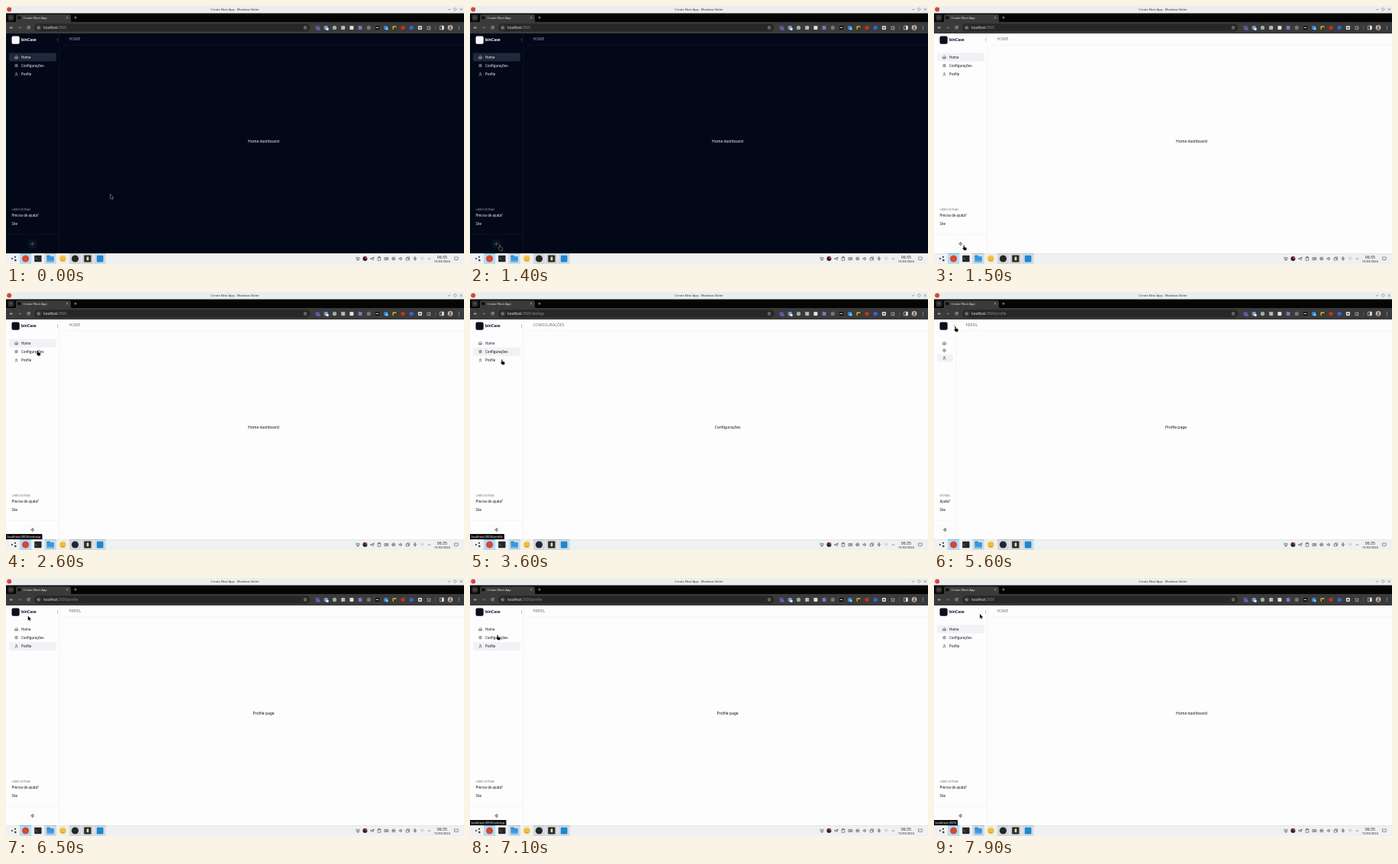
An HTML page for the animation above (8 s loop, 600 px wide and 338 px high).

```html
<!DOCTYPE html>
<html lang="pt">
<head>
<meta charset="utf-8">
<title>Dashboard</title>
<style>
html, body { margin: 0; width: 100%; height: 100%; overflow: hidden; background: #fff; }
svg { display: block; width: 600px; height: 338px; font-family: "Noto Sans", sans-serif; }
</style>
</head>
<body>
<svg id="stage" viewBox="0 0 600 338">
  <g id="page"></g>
  <g id="chrome"></g>
  <g id="live"></g>
  <g id="bar"></g>
  <g id="cursor"></g>
</svg>
<script>
const LOOP = 8000, STEP = 100;
const $ = id => document.getElementById(id);

// Drawing helpers; text is centred on y
const rect = (x, y, w, h, fill, r = 0, extra = '') =>
  `<rect x="${x}" y="${y}" width="${w}" height="${h}" rx="${r}" fill="${fill}" ${extra}/>`;
const dot = (x, y, r, fill, extra = '') => `<circle cx="${x}" cy="${y}" r="${r}" fill="${fill}" ${extra}/>`;
const line = (d, color, w = 0.7, fill = 'none') =>
  `<path d="${d}" fill="${fill}" stroke="${color}" stroke-width="${w}" stroke-linecap="round" stroke-linejoin="round"/>`;
const text = (x, y, s, size, fill, extra = '') =>
  `<text x="${x}" y="${(y + size * 0.36).toFixed(2)}" font-size="${size}" fill="${fill}" ${extra}>${s}</text>`;
const mid = 'text-anchor="middle"';

// Line icons on a 24 unit grid
const ICONS = {
  home: 'M3 10l9-7 9 7v11H3zM9 21v-9h6v9',
  gear: 'M12 3l3 2 4 0 1 4 2 3-2 3-1 4-4 0-3 2-3-2-4 0-1-4-2-3 2-3 1-4 4 0zM9 12a3 3 0 1 0 6 0a3 3 0 1 0-6 0',
  user: 'M8 7a4 4 0 1 0 8 0a4 4 0 1 0-8 0M5 21v-2a4 4 0 0 1 4-4h6a4 4 0 0 1 4 4v2',
  sun: 'M8 12a4 4 0 1 0 8 0a4 4 0 1 0-8 0M12 2v2M12 20v2M2 12h2M20 12h2M5 5l1 1M18 18l1 1M5 19l1-1M18 6l1-1',
  moon: 'M12 7a5 5 0 1 0 5 5a4 4 0 0 1-5-5M12 2v2M12 20v2M2 12h2M5 5l1 1M5 19l1-1M13 3a9 9 0 0 1 0 18',
  back: 'M21 12H4M11 5l-7 7 7 7',
  next: 'M3 12h17M13 5l7 7-7 7',
  reload: 'M20 12a8 8 0 1 1-2.5-6M20 2v6h-6',
  star: 'M12 3l2.8 6 6.2.7-4.6 4.3 1.3 6.5L12 17l-5.7 3.5 1.3-6.5L3 9.7 9.200 9z',
  puzzle: 'M4 7h5a3 3 0 1 1 6 0h5v5a3 3 0 1 0 0 5v4H4v-5a3 3 0 0 0 0-5z',
  down: 'M5 9l7 7 7-7',
  up: 'M5 16l7-7 7 7',
  cross: 'M5 5l14 14M19 5L5 19',
  plus: 'M12 4v16M4 12h16',
  diamond: 'M12 4l8 8-8 8-8-8z',
  send: 'M2 12L22 4l-5 16-6-5zM11 15L22 4',
  clip: 'M5 4h14v18H5zM9 2h6v5H9z',
  keys: 'M2 6h20v13H2zM6 10h1M11 10h1M16 10h1M7 15h10',
  ring: 'M3 12a9 9 0 1 0 18 0a9 9 0 1 0-18 0M9 9h6v6H9z',
  sound: 'M3 9v6h4l6 5V4L7 9zM17 8a5 5 0 0 1 0 8',
  mic: 'M9 3h6v10H9zM5 11a7 7 0 0 0 14 0M12 18v4',
  wifi: 'M2 9a15 15 0 0 1 20 0M6 14a9 9 0 0 1 12 0M12 19h.1',
  copy: 'M3 8h13v13H3zM8 8V3h13v13h-5',
  bell: 'M4 4l4 3h8l4-3v8a8 8 0 0 1-16 0zM9 12h1M14 12h1M8 21h8',
  note: 'M3 4h18v13h-6l-4 4v-4H3z'
};
const icon = (name, x, y, size, color, w = 2, fill = 'none') =>
  `<g transform="translate(${x - size / 2} ${y - size / 2}) scale(${size / 24})">${line(ICONS[name], color, w, fill)}</g>`;
const dots = (x, y, gap, r, color) => [-1, 0, 1].map(i => dot(x, y + i * gap, r, color)).join('');

function windowFrame() {
  const pale = '#d8d8d8';
  let s = rect(0, 0, 600, 9.5, '#eceded') + dot(4.2, 4.6, 3, '#db4437');
  s += text(300, 4.6, 'Create Next App - Meadow Glider', 4.08, '#303336', mid);
  s += icon('down', 580.5, 4.5, 5, '#45494c', 2.5) + icon('diamond', 588.5, 4.5, 5.5, '#45494c', 2.2)
     + icon('cross', 596.3, 4.5, 4.6, '#45494c', 2.5);
  s += rect(0, 9.5, 600, 12, '#050505') + rect(2.3, 11.2, 8, 8, '#303030', 2.3)
     + icon('down', 6.3, 15.3, 4, pale, 3);
  s += '<path d="M10.500 21.500q2.500 0 2.500-2.500v-5.500q0-2.500 2.500-2.500h67q2.500 0 2.500 2.500v5.500q0 2.500 2.500 2.500z" fill="#3a3a3a"/>';
  s += dot(17.3, 15.3, 2.3, '#111') + text(22.5, 15.3, 'Create Next App', 4.1, '#e6e6e6');
  s += icon('cross', 80.2, 15.2, 3.8, pale, 3) + icon('plus', 91, 15.2, 4.4, pale, 2.8);
  s += rect(0, 21, 600, 15, '#3a3a3a') + rect(37, 23.3, 361.5, 10.2, '#272727', 5.1);
  s += icon('back', 7, 28.4, 5, '#e6e6e6', 2.7) + icon('next', 18, 28.4, 5, '#858585', 2.7)
     + icon('reload', 29.4, 28.4, 5.2, '#e6e6e6', 2.6);
  s += dot(42.8, 28.4, 3.4, '#3a3a3a') + icon('ring', 42.8, 28.4, 4.2, pale, 2);
  s += icon('star', 392, 28.4, 5.5, pale);
  const tints = ['#6b4fa0', '#6f9de0', '#a9a9a9', '#b8b8b8', '#dedede', '#7b70c4', '#6f7780',
    '#0c0c0c', '#2b8ae2', '#b79a29', '#c92d2d', '#3463d8', '#e8e8e8'];
  tints.forEach((c, i) => {
    const x = 408 + i * 11.2;
    s += [2, 6, 10, 11].includes(i) ? dot(x, 28.4, 2.6, c) : rect(x - 2.5, 25.9, 5, 5, c, 0.8);
  });
  s += rect(407.8, 28.8, 3.6, 3, '#7a58bd', 0.6) + rect(419.5, 28.8, 3, 3, '#eee', 0.4)
     + rect(484.7, 27.8, 3.2, 1.1, '#eee') + rect(497.5, 28.3, 3, 3, '#7cc8ee', 0.5)
     + rect(508, 28, 3.200, 3.200, '#333', 0.4) + rect(541.4, 27.4, 2.2, 2.2, '#444');
  s += icon('puzzle', 554, 28.4, 5.8, '#e2e2e2', 2.3) + rect(562.2, 25.4, 0.5, 6, '#666');
  s += rect(568.4, 26, 5, 4.8, 'none', 0.5, 'stroke="#e2e2e2" stroke-width=".6"') + rect(571, 26, 2.5, 4.8, '#e2e2e2');
  s += dot(582, 28.4, 3.3, '#cbbcae') + dot(582, 27.3, 1.2, '#71594c')
     + '<path d="M579.800 30.800a2.200 2.200 0 0 1 4.400 0z" fill="#71594c"/>';
  return s + dots(593.3, 28.4, 1.8, 0.5, '#e6e6e6');
}

function taskbar() {
  const ink = '#30363a';
  let s = rect(0, 324, 600, 14, '#eff0f1') + rect(0, 324, 600, 0.4, '#d5d7d9');
  const slot = (x, c, edge) => rect(x, 324.2, 15.2, 13.8, c) + rect(x, 324.2, 15.2, 0.7, edge);
  s += slot(18, '#b4ddf0', '#3daee9') + slot(50.5, '#cfdbe2', '#93bdd4')
     + slot(83, '#d3d8db', '#a9b8c1') + slot(99.3, '#d3d8db', '#a9b8c1') + slot(115.5, '#cfdbe2', '#93bdd4');
  s += dot(8, 331, 1.1, ink) + dot(12, 328.8, 1.1, ink) + dot(12.3, 333, 1.3, ink);
  s += dot(25.6, 331, 4.6, '#db4437');
  s += rect(37.2, 326.8, 9.4, 8.5, '#232629', 0.8) + text(38.4, 330.6, '&gt;_', 3.4, '#e8e8e8');
  s += rect(53.5, 326.8, 4.5, 3, '#2377b8', 0.5) + rect(53.5, 328, 9.4, 7.4, '#3798df', 0.6)
     + rect(53.5, 333.8, 9.4, 1.6, '#63baf1', 0.5);
  s += dot(74.4, 331, 4.5, '#f7c948') + dot(72.8, 330, 0.5, '#6b4a12') + dot(76, 330, 0.5, '#6b4a12')
     + line('M72.500 333q2 1.200 3.800 0', '#6b4a12', 0.5);
  s += dot(90.5, 331, 4.6, '#25262a');
  s += rect(102.3, 326.6, 9.2, 8.8, '#292724', 0.6) + rect(105.6, 328.5, 2.8, 4.8, '#e5d6b1', 0.4);
  s += rect(118.9, 326.8, 8.6, 8.6, '#1f86cf', 1);
  const tray = ['bell', '', 'send', 'clip', 'keys', 'ring', 'sound', 'copy', 'mic', 'wifi', 'up'];
  tray.forEach((n, i) => {
    const x = 461 + i * 9.36;
    s += n ? icon(n, x, 331, 5.6, n === 'wifi' ? '#a0a5a8' : ink, 2.2) : dot(x, 331, 3, '#242424') + dot(x + 1.2, 329.8, 1.4, '#d8363c');
  });
  s += text(571.3, 328.8, '06:35', 5.1, '#232629', mid) + text(571.3, 334.4, '15/03/2024', 3.95, '#232629', mid);
  return s + icon('note', 590, 331, 6, ink);
}

const PAGES = {
  home: { path: '', head: 'HOME', body: 'Home dashboard', row: 0 },
  settings: { path: '/settings', head: 'CONFIGURAÇÕES', body: 'Configurações', row: 1 },
  profile: { path: '/profile', head: 'PERFIL', body: 'Profile page', row: 2 }
};
const NAV = [['home', 'Home'], ['gear', 'Configurações'], ['user', 'Profile']];
const DARK = { bg: '#020817', ink: '#f8fafc', soft: '#94a3b8', edge: '#162033', pick: '#1e293b', btn: '#0a1221' };
const LIGHT = { bg: '#fdfdfd', ink: '#0a0f1c', soft: '#6b7482', edge: '#e5e8ed', pick: '#f1f2f5', btn: '#fdfdfd' };

function drawPage(view, dark, open) {
  const c = dark ? DARK : LIGHT, p = PAGES[view], w = open ? 70 : 29;
  let s = rect(0, 35, 600, 290, c.bg);
  s += rect(w - 0.4, 36, 0.5, 288, c.edge) + rect(w + 5, 50.8, 600 - w - 5, 0.5, c.edge) + rect(0, 298.8, w, 0.5, c.edge);
  s += rect(7.5, 39.6, 10.2, 10.2, c.ink, 2);
  if (open) s += text(20, 44.6, 'binCase', 5, c.ink, 'font-weight="700"');
  s += dots(w - 2.5, 44.6, 1.7, 0.42, c.ink);
  const top = 67, gap = open ? 11.25 : 9.8;
  s += rect(4, top + p.row * gap - (open ? 5.6 : 4.9), open ? 62 : 21, open ? 11.2 : 9.8, c.pick, 1.6);
  NAV.forEach(([name, label], i) => {
    s += icon(name, 13.6, top + i * gap - 0.1, 5, c.ink, 2);
    if (open) s += text(20, top + i * gap, label, 4.375, c.ink);
  });
  s += text(7.5, 266.2, open ? 'LINKS EXTRAS' : 'EXTRAS', 3.75, c.soft);
  s += text(7.5, 274.3, open ? 'Precisa de ajuda?' : 'Ajuda?', 4.375, c.ink) + text(7.5, 285.6, 'Site', 4.375, c.ink);
  const bx = open ? 34.6 : 14.2;
  s += rect(bx - 5.5, 306, 11, 11, c.btn, 1.8, `stroke="${dark ? '#111a2b' : '#f4f5f7'}" stroke-width=".4"`);
  s += icon(dark ? 'sun' : 'moon', bx, 311.5, 5, dark ? '#8b95a5' : c.ink, 2);
  s += text(w + 12.5, 43.6, p.head, 5, c.soft);
  return s + text((w + 600) / 2 + 2.5, 176.7, p.body, 5, c.ink, mid);
}

function drawLive(view, hint) {
  let s = text(49, 28.4, `localhost<tspan fill="#8d8d8d">:3000${PAGES[view].path}</tspan>`, 4.45, '#ededed');
  if (hint) {
    const p = PAGES[hint].path, w = { home: 31, settings: 47.5, profile: 45 }[hint];
    s += `<path d="M0 317h${w - 1}q1 0 1 1v6H0z" fill="#101010"/>` + text(1.5, 320.7, 'localhost:3000' + p, 4.06, '#f0f0f0');
  }
  return s;
}

// Last entry at or before t
const pick = (list, t) => list.reduce((v, [at, next]) => t >= at ? next : v, null);
const VIEWS = [[0, 'home'], [2800, 'settings'], [3700, 'profile'], [7200, 'settings'], [7600, 'home']];
const HINTS = [[2600, 'settings'], [3000, 'profile'], [4500, null], [7000, 'settings'], [7300, 'home']];
const PATH = [[0, 136.5, 246.5], [400, 136.5, 246.5], [600, 133, 240], [1300, 38.5, 313.2], [1700, 38.5, 313.2],
  [2400, 41, 76.5], [2800, 41, 76.5], [3100, 41.3, 88.3], [3900, 41.3, 88.3], [4500, 71, 43.5], [4800, 66.2, 46],
  [5100, 66.2, 46], [5600, 27.5, 45], [6300, 27.5, 45], [7100, 35.5, 74.4], [7200, 35.5, 74.4], [7300, 32, 65],
  [7600, 32, 65], [7900, 60, 47], [8000, 60, 47]];

function pointer(t) {
  const i = Math.max(1, PATH.findIndex(k => k[0] > t));
  const [t0, x0, y0] = PATH[i - 1], [t1, x1, y1] = PATH[i];
  const u = (t - t0) / (t1 - t0), e = u * u * (3 - 2 * u);
  return [x0 + (x1 - x0) * e, y0 + (y1 - y0) * e];
}

const ARROW = 'M0 0v6l1.400-1.200 1 2 .9-.4-.9-2h1.800z';
const HAND = 'M0 .5q.6-1 1.200 0v2.300l2.300.5q.9.2.7 1.200l-.4 2.400h-2.900l-2-2.500q0-.9.900-.5l.2.2z';

function drawCursor(t, open) {
  const [x, y] = pointer(t), w = open ? 70 : 29;
  const onNav = x > 4 && x < w - 4 && y > 61 && y < 95;
  const onLink = x > 7 && x < (y < 280 ? 43 : 15) && y > 271 && y < 288;
  const onBtn = Math.abs(x - (open ? 34.6 : 14.2)) < 5.6 && Math.abs(y - 311.5) < 5.6;
  const onDots = Math.abs(x - w + 2.5) < 3.5 && Math.abs(y - 44.6) < 4;
  const shape = onNav || onLink || onBtn || onDots ? HAND : ARROW;
  return `<path transform="translate(${x.toFixed(2)} ${y.toFixed(2)})" d="${shape}" fill="#080808" stroke="#fff" stroke-width=".6" paint-order="stroke" stroke-linejoin="round"/>`;
}

const shown = {};
function put(id, html) {
  if (shown[id] !== html) $(id).innerHTML = shown[id] = html;
}

function render(ms) {
  const t = Math.floor((ms % LOOP) / STEP) * STEP;
  const view = pick(VIEWS, t), open = t < 5200 || t >= 6400;
  put('page', drawPage(view, t < 1500, open));
  put('live', drawLive(view, pick(HINTS, t)));
  put('cursor', drawCursor(t, open));
}

put('chrome', windowFrame());
put('bar', taskbar());
const start = performance.now();
function tick() {
  render(performance.now() - start);
  requestAnimationFrame(tick);
}
tick();
</script>
</body>
</html>
```
